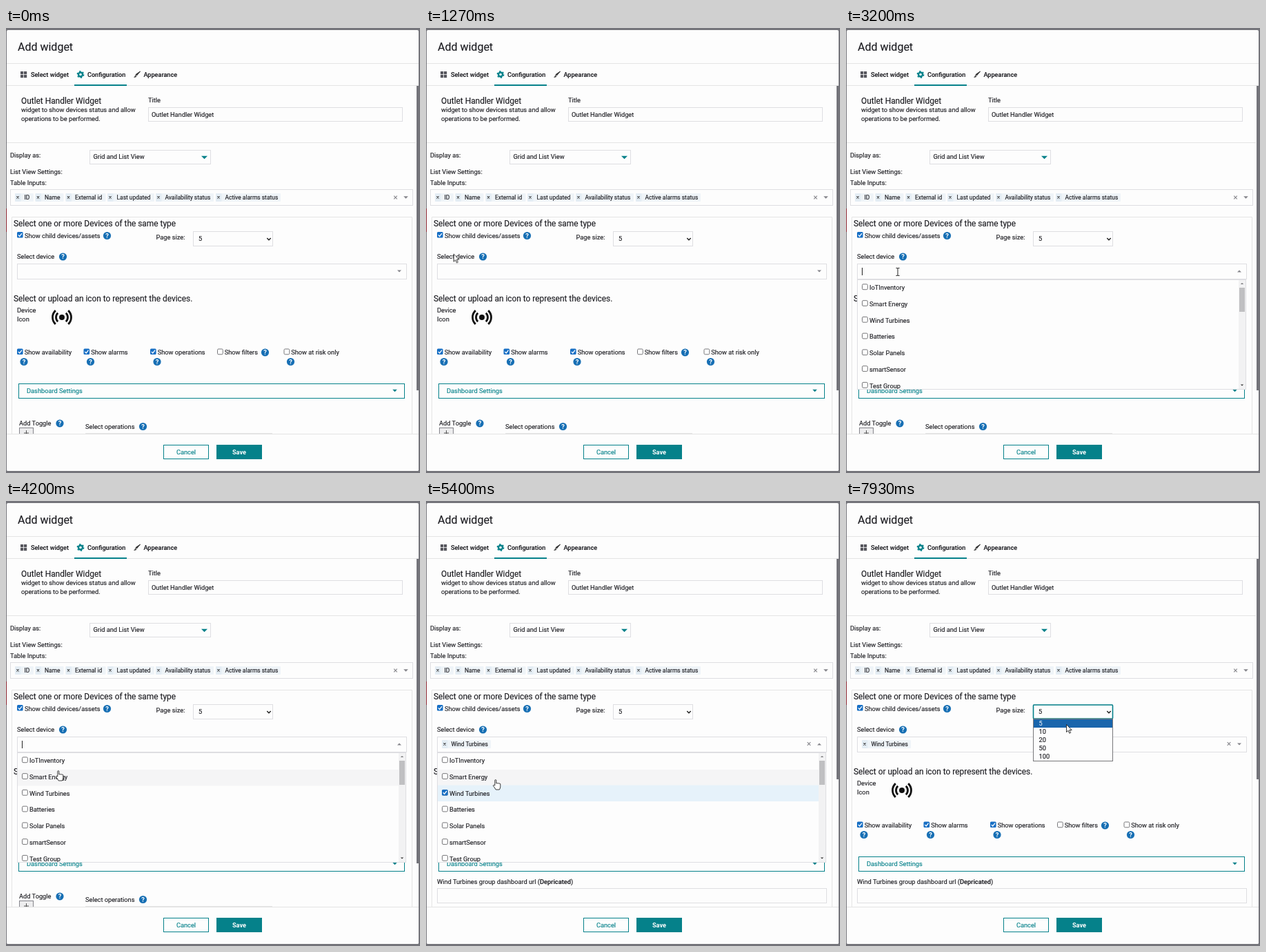
Write an HTML page that moves like this. It is 600x646 px and loops after 8000 ms.

```html
<!DOCTYPE html>
<html lang="en">
<head>
<meta charset="utf-8">
<title>Add widget</title>
<style>
  html, body { margin: 0; width: 100%; height: 100%; overflow: hidden; background: #74747a; }
  svg { display: block; width: 600px; height: 646px; font: 9.25px Roboto, Arial, sans-serif; fill: #1d1d22; }
  text { stroke: #1d1d22; stroke-width: .15; }
  .title { font-size: 16px; }
  .head { font-size: 11.9px; }
  .chip { font-size: 8.45px; }
  .tab { font-size: 9.1px; font-weight: 500; }
  .bold { font-weight: 700; }
  .medium { font-weight: 500; }
  .accent { fill: #05818a; stroke: #05818a; }
  .white { fill: #fff; stroke: none; }
  .mid { text-anchor: middle; }
  .line { fill: none; stroke: #e4e4e4; }
  .field { fill: #fdfdfd; stroke: #dedee2; }
  .outline { fill: #fdfdfd; stroke: #05818a; }

  /* 1 % of the loop is 80 ms */
  .step { animation: 8s step-end infinite; }
  .list { animation-name: list; }
  .caret { animation-name: caret; }
  .before { animation-name: before; }
  .after { animation-name: after; }
  .hover { animation-name: hover; }
  .sizes { animation-name: sizes; }
  .pointer { animation-name: pointer; }
  .beam { animation-name: beam; }
  .hand { animation-name: hand; }
  .cursor { animation: travel 8s ease-in-out infinite; }
  @keyframes list { 0% { opacity: 0 } 38.75% { opacity: 1 } 86% { opacity: 0 } }
  @keyframes caret { 0% { opacity: 0 } 38.75% { opacity: 1 } 45% { opacity: 0 } 51.25% { opacity: 1 } 57.5% { opacity: 0 } }
  @keyframes before { 0% { opacity: 1 } 60% { opacity: 0 } }
  @keyframes after { 0% { opacity: 0 } 60% { opacity: 1 } }
  @keyframes hover {
    0% { opacity: 0 }
    46% { opacity: 1; transform: none }
    49.5% { opacity: 1; transform: translateY(23.7px) }
    56% { opacity: 1; transform: translateY(47.4px) }
    65.5% { opacity: 1; transform: translateY(23.7px) }
    71% { opacity: 1; transform: none }
  }
  @keyframes sizes { 0% { opacity: 0 } 92.5% { opacity: 1 } }
  @keyframes pointer { 0% { opacity: 0 } 3.5% { opacity: 1 } 23.5% { opacity: 0 } 33.5% { opacity: 1 } 36% { opacity: 0 } 73.5% { opacity: 1 } }
  @keyframes beam { 0% { opacity: 0 } 23.5% { opacity: 1 } 33.5% { opacity: 0 } 36% { opacity: 1 } 45.5% { opacity: 0 } }
  @keyframes hand { 0% { opacity: 0 } 45.5% { opacity: 1 } 73.5% { opacity: 0 } }
  @keyframes travel {
    0%, 3.5% { transform: translate(4px, 352px) }
    7.5%, 15% { transform: translate(39px, 328px) }
    25%, 32% { transform: translate(81px, 303px) }
    37%, 44% { transform: translate(75px, 354px) }
    50%, 53% { transform: translate(75px, 391px) }
    58.5%, 62.5% { transform: translate(86px, 424px) }
    67%, 68% { transform: translate(100px, 404px) }
    75% { transform: translate(150px, 346px) }
    81%, 86% { transform: translate(169px, 333px) }
    91%, 94% { transform: translate(330px, 306px) }
    98.5%, 100% { transform: translate(319px, 324px) }
  }
</style>
</head>
<body>
<svg id="stage" viewBox="0 0 600 646"></svg>
<script>
const ACCENT = '#05818a', PAPER = '#fdfdfd', EDGE = '#74747a', MUTED = '#84848a';
const text = (x, y, s, cls = '') => `<text x="${x}" y="${y}" class="${cls}">${s}</text>`;
const rect = (x, y, w, h, attrs) => `<rect x="${x}" y="${y}" width="${w}" height="${h}" ${attrs}/>`;
const box = (x, y, w, h, cls = 'field') => rect(x + .5, y + .5, w - 1, h - 1, `class="${cls}"`);
const path = (d, attrs) => `<path d="${d}" ${attrs}/>`;
const rule = (x1, x2, y) => path(`M${x1} ${y + .5}H${x2}`, 'class="line"');
const triangle = (x, y, r, fill, dir = 1) => path(`M${x - r} ${y - dir * r / 2}h${2 * r}l${-r} ${dir * r}z`, `fill="${fill}"`);
const cross = (x, y, r, color) => path(`M${x - r} ${y - r}l${2 * r} ${2 * r}m0 ${-2 * r}l${-2 * r} ${2 * r}`, `stroke="${color}" stroke-width="1.1"`);
const step = (cls, body) => `<g class="step ${cls}">${body}</g>`;

const help = (x, y) =>
  `<circle cx="${x}" cy="${y}" r="5.6" fill="#176fb4"/>` + text(x, y + 3.2, '?', 'bold white mid');

const check = (x, y, on) => on
  ? rect(x, y, 8.6, 8.6, 'rx="1.5" fill="#176fc4"') +
    path(`M${x + 1.8} ${y + 4.4}l1.9 2 3.3-4.3`, 'fill="none" stroke="#fff" stroke-width="1.3"')
  : rect(x + .5, y + .5, 7.8, 7.8, 'rx="1.5" fill="#fff" stroke="#77777a"');

const chip = (x, y, label, width) =>
  rect(x - 4, y - 6, width + 18, 12, 'rx="1" fill="#eff4f8"') +
  rect(x - 4, y - 6, 8.5, 12, 'rx="1" fill="#e4edf4"') +
  cross(x, y, 1.6, '#333') + text(x + 9.5, y + 3, label, 'chip');

const frame = () =>
  rect(0, 262, 1.5, 34, 'fill="#8c2430"') +
  rect(1, 3, 597, 640, `rx="2" fill="${PAPER}"`) +
  text(17, 33, 'Add widget', 'title') + rule(1, 598, 51) + rule(1, 598, 83);

const tabs = () => {
  const tiles = [0, 5].flatMap(dx => [0, 5].map(dy => rect(21 + dx, 63 + dy, 4.2, 4.2, 'fill="#55555c"'))).join('');
  const gear = `<circle cx="108" cy="67.5" r="3" fill="none" stroke="${ACCENT}" stroke-width="2.4"/>
    <circle cx="108" cy="67.5" r="4.6" fill="none" stroke="${ACCENT}" stroke-width="1.6" stroke-dasharray="2.2 2.617"/>`;
  const brush = path('M194.5 63l-5 6-1.5-1.5z', 'fill="#333" stroke="#333"') +
    path('M187.5 68l2 2q-1 2.5-4.5 2 1.5-1.5 2.5-4z', 'fill="#555"');
  return tiles + gear + brush + text(36, 71, 'Select widget', 'tab') + text(118, 71, 'Configuration', 'tab') +
    text(199.5, 71, 'Appearance', 'tab') + rect(99, 82, 76, 2, `fill="${ACCENT}"`);
};

const settings = () => {
  const chips = [[17, 'ID', 9], [46.5, 'Name', 23], [90.5, 'External id', 40], [151, 'Last updated', 50],
    [221, 'Availability status', 66], [308, 'Active alarms status', 76]];
  return text(22, 110, 'Outlet Handler Widget', 'head') +
    text(22, 122, 'widget to show devices status and allow') + text(22, 135, 'operations to be performed.') +
    text(206, 108, 'Title') + box(206, 115, 369, 21) + text(211, 129, 'Outlet Handler Widget') +
    rule(1, 594, 166) +
    text(6, 188, 'Display as:') + box(121, 177, 176, 21) + text(126.5, 190, 'Grid and List View') +
    triangle(287.5, 188, 4.5, ACCENT) +
    text(6, 212, 'List View Settings:') + text(6, 228, 'Table Inputs:') + box(6, 234, 584, 24) +
    chips.map(([x, label, w]) => chip(x, 246, label, w)).join('') +
    cross(564.5, 246, 2.3, MUTED) + triangle(579.5, 246, 3.3, MUTED);
};

const devices = () => {
  const options = [[16, 'Show availability', 26, 484.5, 1], [112.5, 'Show alarms', 122.5, 484.5, 1],
    [209, 'Show operations', 219, 484.5, 1], [306, 'Show filters', 375.5, 471, 0], [402.5, 'Show at risk only', 412.5, 484.5, 0]];
  const arcs = [8.5, 13.5].map(r => {
    const x = r * .68, y = r * .733;
    return [-1, 1].map(s => path(`M${81 + s * x} ${420 - y}A${r} ${r} 0 0 ${s > 0 ? 1 : 0} ${81 + s * x} ${420 + y}`,
      'fill="none" stroke="#111" stroke-width="2.8"')).join('');
  }).join('');
  return path('M8.5 589V274.5H588.5V589', 'class="line"') +
    text(11, 288, 'Select one or more Devices of the same type', 'head') +
    check(16, 296, 1) + text(27, 304.5, 'Show child devices/assets') + help(146.5, 301.5) +
    text(217.5, 307, 'Page size:') + box(271, 295, 116, 22) + text(279, 309, '5') +
    path('M378.3 305l2.7 2.7 2.7-2.7', 'fill="none" stroke="#222" stroke-width="1.5"') +
    text(16, 335, 'Select device') + help(82.5, 332) + box(16, 342, 565, 23) +
    text(11, 396.5, 'Select or upload an icon to represent the devices.', 'head') +
    text(16, 413, 'Device') + text(16, 426, 'Icon') +
    '<circle cx="81" cy="420" r="4" fill="#111"/>' + arcs +
    options.map(([x, label, hx, hy, on]) => check(x, 465.5, on) + text(x + 10.7, 474, label) + help(hx, hy)).join('') +
    box(18, 516, 560, 22, 'outline') + text(30, 529.5, 'Dashboard Settings', 'accent') + triangle(563.5, 526.5, 3.3, ACCENT);
};

const lowerPart = () =>
  step('before',
    text(19, 576.5, 'Add Toggle') + help(78, 574) +
    rect(19.5, 580.5, 20, 12, 'fill="#ededee" stroke="#85858c"') +
    path('M29.5 584v8m-3.5-4h7', 'stroke="#555"') +
    text(115, 581.5, 'Select operations') + help(198.5, 578.5) + rule(115, 386, 588) +
    rect(595, 84, 3, 442, `fill="${EDGE}"`)) +
  step('after',
    text(16, 556, 'Wind Turbines group dashboard url (<tspan class="medium">Depricated</tspan>)') +
    box(16, 562, 565, 22) + rect(595, 84, 3, 320, `fill="${EDGE}"`));

const footer = () =>
  rect(1, 589, 597, 54, `rx="2" fill="${PAPER}"`) + rule(1, 598, 589) +
  box(228, 605, 66, 21, 'outline') + text(261, 618.5, 'Cancel', 'accent mid') +
  rect(305, 605, 66, 21, `fill="${ACCENT}"`) + text(338, 618.5, 'Save', 'bold white mid');

const deviceList = () => {
  const names = ['IoTInventory', 'Smart Energy', 'Wind Turbines', 'Batteries', 'Solar Panels', 'smartSensor', 'Test Group'];
  const rowY = i => 376.7 + i * 23.75;
  const rows = names.map((name, i) => check(23, rowY(i) - 5.3, 0) + text(34, rowY(i) + 3.5, name)).join('');
  return box(16, 365, 564, 160) +
    step('hover', rect(17, 366, 552, 23.5, 'fill="#f5f5f6"')) +
    step('after', rect(17, 412.5, 552, 23.5, 'fill="#e6f2fa"')) +
    `<g clip-path="url(#listClip)">${rows}</g>` +
    step('after', check(23, rowY(2) - 5.3, 1)) +
    rect(569, 366, 10, 158, 'fill="#f2f2f3"') + rect(570, 377, 8, 35, 'fill="#c0c0c2"') +
    triangle(574, 371, 2.2, '#77777a', -1) + triangle(574, 518.5, 2.2, '#333');
};

const deviceField = () =>
  triangle(570, 353, 3, MUTED) +
  step('list', rect(565, 348, 10, 10, `fill="${PAPER}"`) + triangle(570, 353, 3, MUTED, -1)) +
  step('caret', rect(23, 348, 1, 11, 'fill="#222"')) +
  step('after', chip(27, 353, 'Wind Turbines', 53) + cross(555, 352.5, 2.3, MUTED));

const pageSizes = () =>
  rect(271.5, 296, 115, 20, `fill="none" stroke="${ACCENT}" stroke-width="1.6" rx="1"`) +
  rect(271.5, 316.5, 115, 61, `fill="${PAPER}" stroke="#77777a"`) +
  rect(272, 317, 114, 12, 'fill="#1965ac"') +
  [5, 10, 20, 50, 100].map((n, i) => text(279.5, 326.3 + i * 11.9, n, i ? '' : 'white')).join('');

const cursor = () => {
  const ink = 'fill="#fff" stroke="#222" stroke-width=".9" stroke-linejoin="round"';
  return '<g class="cursor">' +
    step('pointer', path('M.5.5v11l2.5-2.3 1.8 4 1.8-.8-1.8-3.9h3.4z', ink)) +
    step('beam', path('M-2.5-5.5h2l.5.7.5-.7h2M0-5V5M-2.5 5.5h2L0 4.8l.5.7h2', 'fill="none" stroke="#222"')) +
    step('hand', path('M-.2 9V1.2q1-1.3 2 0V6q1-1.1 2 0 1-.9 2 .2 1.1-.8 2 .5v4.2q-.2 2.2-1.4 4.1H1.2Q-.6 11.8-2.8 9.2q.6-1.6 2.6-.2z', ink)) +
    '</g>';
};

document.getElementById('stage').innerHTML =
  `<clipPath id="listClip">${rect(17, 365, 552, 159, '')}</clipPath>` +
  rect(0, 0, 600, 646, `fill="${EDGE}"`) +
  frame() + tabs() + settings() + devices() + lowerPart() + deviceField() +
  step('list', deviceList()) + step('sizes', pageSizes()) + footer() + cursor();
</script>
</body>
</html>
```
